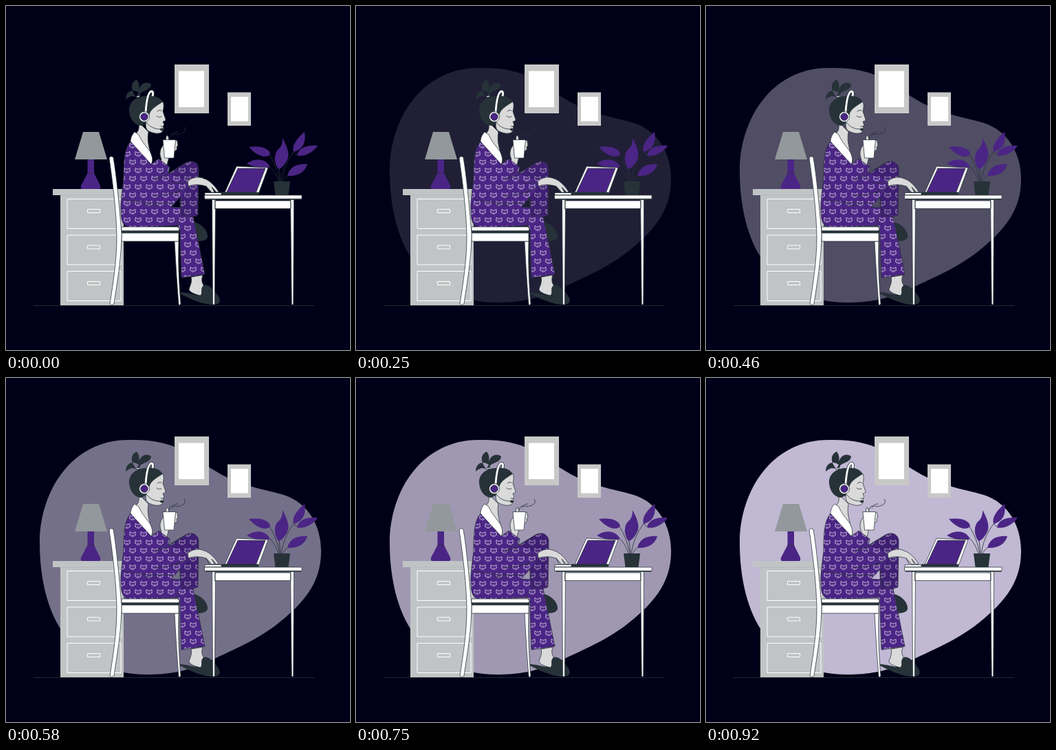
These frames come from a looping animation (500 px wide and 500 px high, 1000 ms). An HTML page:

```html
<!DOCTYPE html>
<html lang="en">
<head>
<meta charset="utf-8">
<title>Working from home</title>
<style>
  html, body { margin: 0; width: 100%; height: 100%; overflow: hidden; background: #000118; }
  svg { display: block; width: 100vw; height: 100vh; }
  .ink { fill: #263238; }
  .violet { fill: #4b2585; }
  .grey { fill: #c0c4c5; }
  .skin { fill: #dadada; }
  .white { fill: #fff; }
  .edge { stroke: #263238; stroke-width: .75; stroke-linejoin: round; }
  .line { fill: none; stroke: #263238; stroke-width: .8; stroke-linecap: round; }
  .trim { fill: none; stroke: #fff; stroke-width: 1; }
</style>
</head>
<body>
<svg viewBox="0 0 500 500">
  <defs>
    <g id="cat" fill="none" stroke="#e4dcef" stroke-width=".8" stroke-linejoin="round">
      <path d="M-3.800-3.600l2 1.700h3.600l2-1.700c.9 3.800 0 6.800-3.800 6.800s-4.700-3-3.800-6.800z"/>
      <path d="M-1.600 1.200q.8 1 1.600 0q.8 1 1.600 0M-5 1h1.400M3.600 1H5" stroke-width=".6"/>
    </g>
    <pattern id="cats" width="16" height="24" patternUnits="userSpaceOnUse" x="168" y="209">
      <rect class="violet" width="16" height="24"/>
      <use href="#cat" x="8" y="6"/>
      <use href="#cat" x="0" y="18"/>
      <use href="#cat" x="16" y="18"/>
    </pattern>
    <g id="drawer" class="trim">
      <path d="M89 280.500h78v43H89z"/>
      <path d="M118.500 295.500h18v5h-18z"/>
    </g>
  </defs>

  <rect width="500" height="500" fill="#000118"/>
  <path id="blob" fill="#c8beda" opacity="0" d="M49 240C49 165 95 90 178 90C245 88 268 112 299 132C340 158 370 160 404 170C440 182 458 215 458 252C458 300 430 330 390 361C355 386 325 397 295 412C262 427 235 431 205 431C150 431 115 410 85 373C60 340 49 290 49 240Z"/>
  <path class="line" d="M40 435.500H448"/>

  <!-- wall frames -->
  <path fill="#c8c8c8" d="M245 85h50v71h-50zM322 125.500h34V174h-34z"/>
  <path class="white" d="M251 94.500h37V147h-37zM327 132h25v35.500h-25z"/>

  <!-- lamp and dresser -->
  <path fill="#92989b" d="M112 183h23l12 40h-47z"/>
  <path class="violet" d="M118.500 223H128v20l9 18q1 5-2 5h-24q-3 0-2-5l9.500-18z"/>
  <path class="line" d="M118.500 243H128"/>
  <path class="grey" d="M68 266h103v169H79V275H68z"/>
  <path d="M79 275h92" stroke="#b0b4b6" stroke-width=".8"/>
  <use href="#drawer"/>
  <use href="#drawer" y="52.500"/>
  <use href="#drawer" y="105"/>

  <!-- feet -->
  <path class="ink" d="M271 314C281 314 294 325 293 336C290 343 280 342 271 341Z"/>
  <path class="skin edge" d="M269 394L286 391C283 400 286 404 288 407C288 414 287 420 283 421C274 419 267 416 266 412C267 407 271 402 269 394Z"/>
  <path class="ink" d="M253 416C262 416 273 420 282 421C287 417 281 412 287 406C294 403 303 413 308 421C313 428 312 434 300 434C285 434 264 424 253 418Z"/>

  <!-- neck, hair and face -->
  <path class="skin edge" d="M192 168C195 178 192 183 188 186L204 211L211 222C210 208 204 199 207 183Z"/>
  <path class="ink" d="M193 126C185 120 174 123 174 136C180 130 186 130 190 133C180 121 181 111 190 107C194 112 194 117 193 122C196 112 204 109 211 114C210 122 202 122 195 127L194 133H189Z"/>
  <path d="M190 132l4-1" stroke="#fff" stroke-width="1.200"/>
  <path class="ink" d="M179 153C178 139 190 131 204 131C217 129 227 134 229 143L219 164L196 174C186 173 180 164 179 153Z"/>
  <path class="skin edge" d="M228 139C230 144 229 149 228 153C229 157 231 161 232 165C232 167 230 167 228 168C229 171 231 173 228 175C230 178 228 185 222 185C216 186 210 183 206 181C201 176 203 164 208 158C210 150 217 146 228 139Z"/>
  <path class="line" d="M220 153q3-3 6-1M219 160q3 3 7 1M225 175h3"/>
  <path class="line" d="M203 154C204 140 206 126 211 124C214 124 214 127 213 131" style="stroke-width:4.500"/>
  <path d="M203 154C204 140 206 126 211 124C214 124 214 127 213 131" fill="none" stroke="#fff" stroke-width="2.800"/>
  <circle class="white edge" cx="201" cy="161" r="7.500"/>
  <circle class="violet edge" cx="201" cy="161" r="5.300"/>
  <path class="line" d="M204 169C210 177 217 179 225 179"/>
  <ellipse class="ink" cx="226.500" cy="179.500" rx="2.500" ry="2"/>

  <!-- cup in hand -->
  <path class="skin edge" d="M230 201C224 206 222 215 226 223L222 228L233 235L237 219ZM232 195L233 189Q235 187 236 190L237 196ZM245 196Q250 194 249 198Q251 203 248 205Q250 210 244 211Z"/>
  <path class="white edge" d="M228 194.500h18.500L244 221h-13.500z"/>
  <path class="line" d="M237 192C239 181 246 189 253 186C260 184 262 180 259 176M241 189C243 184 247 183 250 183"/>

  <!-- pyjamas -->
  <path class="edge" fill="url(#cats)" fill-rule="evenodd" d="M183 195C172 205 171 225 171 250C169 270 166 285 167 298C167 315 171 321 184 322L250 319Q254 324 253 340L255 395L289 390L272 306L279 304L280 236C279 227 270 223 261 228L236 243L238 234L222 222L211 230ZM240 292L253 278V293Z"/>
  <path fill="#000118" opacity=".16" d="M261 228C270 223 279 227 280 236L279 304L255 305L253 278L265 262V255L236 243Z"/>
  <path class="line" d="M261 228L234 246L218 252M236 236L216 254M232 247C238 259 252 260 265 255V262C252 270 235 275 215 276M171 281C195 286 220 287 243 286M245 274L254 268M253 278L255 305L272 306M200 286C205 291 214 291 222 290M247 320L252 308"/>
  <path class="white edge" d="M187 183C183 187 181 192 181 197C190 207 201 219 211 230C214 225 213 219 209 211C202 202 196 195 193 187Z"/>

  <!-- chair -->
  <path class="white edge" d="M245 342h6C250 380 252 410 254 433Q252 436 251 434C249 410 247 380 245 342Z"/>
  <path class="white edge" d="M168 330h83v12h-83zM168 321H250Q253 323 251 327H168z"/>
  <path class="ink" d="M168 326.500h84v3.500h-84z"/>
  <path class="white edge" d="M150 221Q152 217 156 220C161 250 164 285 168 330C168 370 160 410 157 433Q153 436 151 433C156 400 161 370 161 335C160 290 154 250 150 221Z"/>

  <!-- desk -->
  <path class="white edge" d="M303 283h111v11.500H303zM299.500 281h5l-1.200 153h-2.800zM413.500 281h5l-.8 153h-2.500z"/>
  <path class="ink" d="M290 280h139v1.700H290z"/>
  <path class="white edge" d="M288.500 275h141.500v5.300H288.500z"/>

  <!-- plant -->
  <path class="line" d="M383 216C392 230 396 245 398 256M397 236L399 256M418 212C408 225 402 240 400 256M424 217L418 212L427 197M409 247C405 250 403 252 402 256M384 234C390 240 394 248 396 256"/>
  <g class="violet">
    <path d="M353 205C365 203 382 205 384 215C380 222 366 220 353 205Z"/>
    <path d="M402 192C408 203 413 215 409 223C405 232 400 236 396 237C389 228 389 214 396 208C401 204 402 198 402 192Z"/>
    <path d="M434 183C436 197 433 208 418 212C415 203 422 193 434 183Z"/>
    <path d="M453 203C445 215 430 220 423 217C425 206 438 202 453 203Z"/>
    <path d="M438 230C434 243 422 248 409 247C412 233 424 229 438 230Z"/>
    <path d="M350 229C360 221 377 220 384 234C372 237 362 235 350 229Z"/>
  </g>
  <path class="ink" d="M389 255h24l-2.500 20h-19z"/>

  <!-- laptop and typing hand -->
  <path class="white edge" d="M335 233L381 235L367 273L318 271Z"/>
  <path class="violet edge" d="M337 236H377L363.500 271H320.500Z"/>
  <path class="ink" d="M313 270.500h54v4h-54z"/>
  <path class="white edge" d="M289 271.500h24v3h-24z"/>
  <path class="skin edge" d="M264 255C270 249 280 247 288 251C297 254 304 262 309 270L306 271L299 263L303 271H299L291 262C281 259 273 259 265 262Z"/>
  <path class="line" d="M291 262L295 270"/>
</svg>
<script>
  const LOOP = 1000, FPS = 24;
  const blob = document.getElementById('blob');
  // fade curve: [step, opacity]
  const fade = [[0, 0], [2, .02], [4, .075], [6, .155], [9, .295], [11, .4], [16, .715], [18, .8], [22, .97]];
  const held = [1, 10, 17, 23];

  function opacityAt(ms) {
    let step = Math.min(23, Math.floor((ms + 5) * FPS / 1000));
    if (held.includes(step)) step--;
    const i = Math.max(1, fade.findIndex(([s]) => s >= step));
    const [s0, a0] = fade[i - 1], [s1, a1] = fade[i];
    return a0 + (a1 - a0) * (step - s0) / (s1 - s0);
  }

  const start = performance.now();
  function draw(now) {
    blob.setAttribute('opacity', opacityAt(Math.max(0, now - start) % LOOP));
    requestAnimationFrame(draw);
  }
  draw(start);
</script>
</body>
</html>
```
